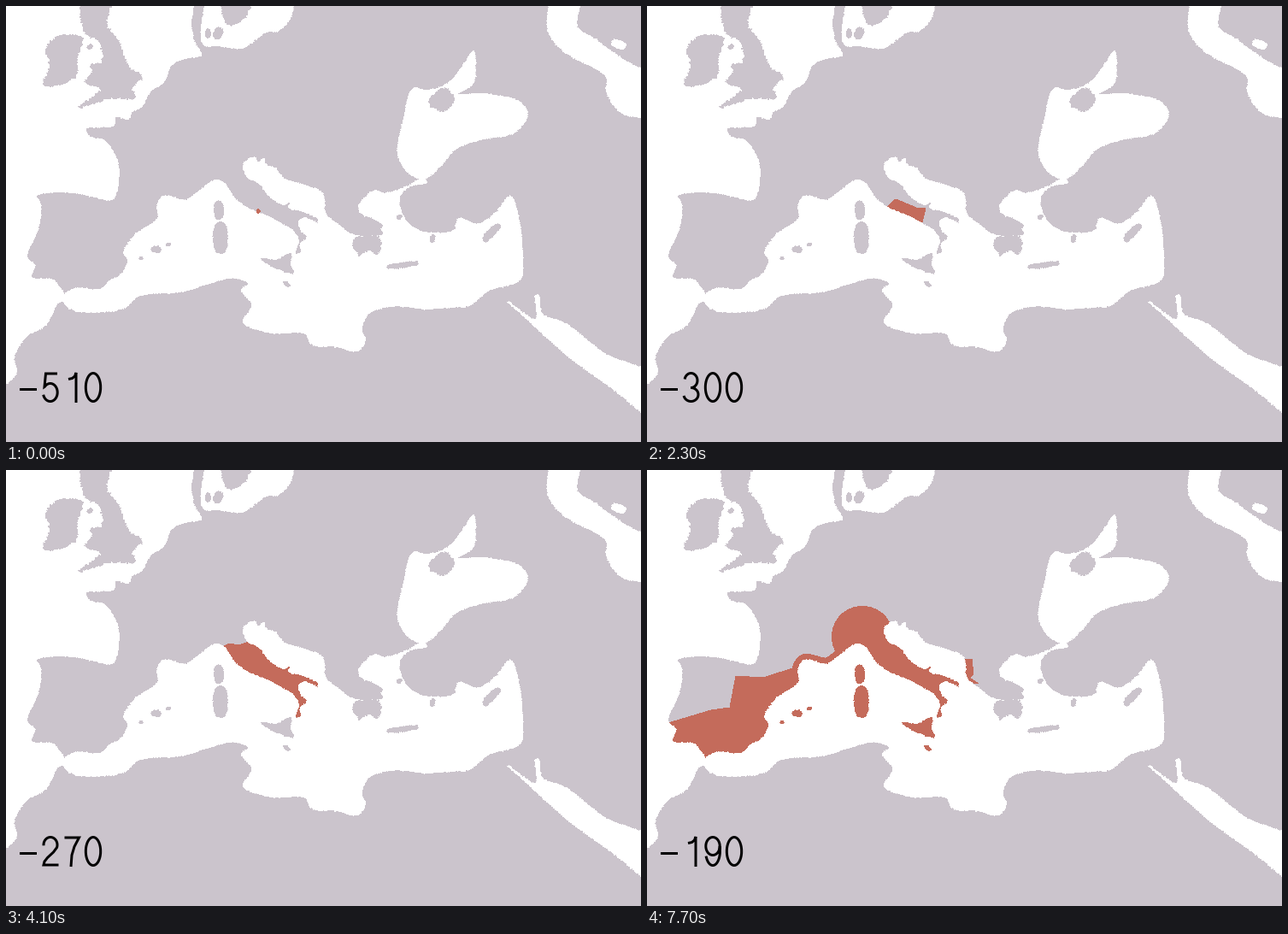
Animation, 743 px wide and 510 px high, one loop 8 s. Source, as a matplotlib script:

```python
import numpy as np
import matplotlib.pyplot as plt
from matplotlib.animation import FuncAnimation
from matplotlib.patches import Circle, PathPatch, Polygon
from matplotlib.path import Path

W, H, DPI = 743, 510, 64
PX = 72 / DPI
LAND, SEA, RED = "#cbc4cc", "#ffffff", "#c46b5b"
INTERVAL, FRAMES = 100, 80
CHANGES = [500, 2300, 4100, 5900, 7700]
YEARS = ["510", "320", "300", "270", "220", "190"]

# Key points of the shores; curve() bends through them, outline() roughens them
ATLANTIC = [
    (-30, -30), (216, -30), (218, 6), (216, 22), (221, 44), (228, 57),
    (210, 61), (193, 69), (185, 88), (168, 100), (158, 118), (146, 124),
    (143, 132), (128, 129), (126, 139), (93, 143), (98, 153), (115, 158),
    (130, 182), (130, 212), (124, 226), (100, 222), (80, 218), (48, 218),
    (35, 222), (40, 232), (37, 262), (24, 293), (33, 304), (29, 318),
    (55, 321), (68, 338), (70, 342), (60, 348), (46, 373), (24, 386),
    (9, 412), (12, 428), (-5, 446), (-30, 460)]
BALTIC = [(238, -30), (232, 5), (229, 26), (231, 45), (250, 46), (276, 49),
          (305, 30), (318, 29), (334, 10), (330, -30)]
SPAIN = [(68, 338), (80, 331), (112, 331), (122, 321), (133, 316), (143, 298),
         (138, 288)]
RIVIERA = [(152, 267), (178, 248), (177, 234), (184, 223), (210, 227),
           (221, 221), (234, 210)]
ITALY = [
    (246, 204), (256, 208), (268, 226), (286, 238), (304, 245), (322, 255),
    (335, 263), (342, 274), (338, 290), (346, 288), (345, 279), (353, 270),
    (346, 263), (343, 253), (349, 248), (360, 252), (366, 256), (365, 249),
    (344, 239), (331, 236), (333, 229), (325, 232), (308, 222), (297, 208),
    (282, 199), (278, 186), (291, 177)]
BALKANS = [
    (294, 184), (301, 179), (304, 186), (315, 190), (325, 202), (350, 210),
    (370, 219), (374, 243), (390, 257), (406, 268), (442, 267), (438, 259),
    (422, 248), (413, 235), (430, 217), (444, 219), (466, 213), (488, 202)]
ANATOLIA = [
    (492, 206), (470, 212), (460, 224), (463, 242), (472, 256), (484, 263),
    (503, 266), (524, 263), (530, 249), (552, 255), (572, 243), (590, 223),
    (600, 250), (604, 295), (601, 320), (564, 333), (542, 350)]
AFRICA = [
    (520, 352), (490, 354), (451, 351), (424, 360), (416, 378), (420, 390),
    (412, 403), (385, 398), (358, 396), (350, 383), (310, 382), (278, 370),
    (288, 350), (276, 332), (284, 325), (266, 318), (205, 334), (155, 339),
    (138, 353), (85, 357), (72, 351), (66, 341)]
BLACK_SEA = [
    (476, 97), (495, 99), (518, 90), (536, 68), (547, 53), (549, 70),
    (546, 91), (528, 103), (560, 103), (600, 112), (610, 126), (595, 148),
    (555, 156), (525, 168), (508, 187), (488, 202), (470, 194), (459, 172),
    (466, 130)]
CASPIAN = [(645, -20), (634, 26), (650, 51), (703, 83), (703, 100), (722, 126),
           (770, 124), (770, 80), (735, 70), (688, 38), (668, 24), (674, -20)]
RED_SEA = [(588, 346), (620, 367), (620, 339), (623, 339), (627, 360),
           (655, 372), (703, 408), (770, 438), (770, 490), (712, 449),
           (656, 408), (605, 362)]
BRITAIN = [
    (92, -20), (92, 30), (110, 42), (112, 66), (99, 70), (103, 76), (93, 89),
    (112, 97), (86, 118), (120, 108), (150, 106), (146, 97), (158, 82),
    (145, 73), (130, 40), (118, 22), (126, -20)]
IRELAND = [(60, 36), (88, 38), (83, 60), (81, 82), (45, 93), (52, 66), (47, 52)]
SWEDEN = [(254, -20), (257, 18), (264, 22), (283, 8), (284, -20)]
CRIMEA = [(495, 112), (512, 97), (524, 108), (512, 123)]
PELOPONNESE = [(407, 274), (424, 269), (438, 274), (434, 290), (425, 285),
               (413, 290)]
SICILY = [(299, 296), (318, 297), (333, 290), (332, 302), (336, 312), (318, 307)]

# Small islands: centre x, centre y, length, width, tilt in degrees
PLAIN_ISLES = [(236, 32, 10, 5, 90), (248, 32, 13, 9, 110), (430, 253, 22, 5, 28),
               (464, 303, 36, 5, -7), (568, 265, 26, 8, -45), (499, 272, 9, 4, 100),
               (460, 247, 5, 4, 0), (98, 48, 6, 4, -30)]
TAKEN_ISLES = {4: [(249, 239, 21, 10, 90), (251, 271, 36, 16, 90)],
               5: [(328, 325, 8, 3, 40), (176, 285, 11, 6, 0),
                   (190, 279, 5, 3, 0), (158, 295, 4, 3, 0)]}

# Territories reach over the water; the sea on top trims them to the coast
SETTLEMENT = [(293, 240), (295, 237), (298, 240), (295, 243)]
LATIUM = [(290, 233), (301, 236), (313, 241), (314, 249), (309, 252), (286, 239)]
CENTRE = [(291, 226), (315, 236), (326, 237), (322, 253), (316, 258), (281, 235)]
PENINSULA = [(255, 206), (262, 203), (272, 205), (285, 201), (296, 200),
             (310, 210), (370, 246), (372, 260), (348, 296), (325, 275), (255, 222)]
ILLYRIA = [(366, 221), (380, 221), (382, 239), (377, 243), (388, 250), (370, 247)]
IBERIA = [(104, 241), (136, 243), (180, 229), (185, 240), (140, 325), (68, 340),
          (20, 325), (22, 297), (75, 281), (97, 278)]


def curve(points, closed=True):
    """Centripetal Hermite spline through the points, about one step per pixel."""
    p = np.array(points, float)
    if closed:
        p = np.vstack([p[-2:], p, p[:3]])
    chord = np.hypot(*np.diff(p, axis=0).T)
    t = np.append(0, np.cumsum(np.sqrt(chord)))
    slope = np.gradient(p, t, axis=0)
    first, last = (2, len(p) - 3) if closed else (0, len(p) - 1)
    s = np.linspace(t[first], t[last], int(chord[first:last].sum()) + 8,
                    endpoint=not closed)
    i = np.clip(np.searchsorted(t, s, side="right") - 1, 0, len(p) - 2)
    gap = (t[i + 1] - t[i])[:, None]
    u = (s - t[i])[:, None] / gap
    return ((1 + 2 * u) * (1 - u) ** 2 * p[i] + u * (1 - u) ** 2 * gap * slope[i]
            + u ** 2 * (3 - 2 * u) * p[i + 1] + u ** 2 * (u - 1) * gap * slope[i + 1])


def outline(points, noise=0.35):
    """Smooth closed shore with a fine saw-tooth edge."""
    line = curve(points)
    rng = np.random.default_rng(4)
    dx, dy = np.gradient(line, axis=0).T
    normal = np.column_stack([-dy, dx]) / (np.hypot(dx, dy) + 1e-9)[:, None]
    saw = 0.5 * (-1.0) ** np.arange(len(line))
    return line + normal * (saw + rng.normal(0, noise, len(line)))[:, None]


def isle(cx, cy, length, width, tilt):
    """Rounded box outline."""
    t = np.linspace(0, 2 * np.pi, 16, endpoint=False)
    x = length / 2 * np.sign(np.cos(t)) * np.abs(np.cos(t)) ** 0.8
    y = width / 2 * np.sign(np.sin(t)) * np.abs(np.sin(t)) ** 0.8
    c, s = np.cos(np.radians(tilt)), np.sin(np.radians(tilt))
    return np.column_stack([cx + c * x - s * y, cy + s * x + c * y])


def arc(cx, cy, rx, ry, start, end):
    t = np.radians(np.linspace(start, end, 40))
    return list(zip(cx + rx * np.cos(t), cy + ry * np.sin(t)))


DIGITS = {
    "0": arc(10.5, 18.5, 8.7, 16.5, 0, 360),
    "1": [(6.5, 9), (11, 8), (14, 5.5), (15.5, 1.5), (15.5, 36.5)],
    "2": (arc(10.5, 11, 8, 9, 175, 380)
          + [(14, 19.5), (7, 26), (3.5, 30.5), (2.5, 34.5), (20, 34.5)]),
    "3": arc(10, 10.5, 7.5, 8.5, 190, 450) + arc(10, 27, 8.5, 8, 270, 530),
    "5": [(18.5, 2.5), (5, 2.5), (3.5, 18)] + arc(10.3, 24.5, 8.4, 10.5, 220, 525),
    "7": [(2, 2.5), (19, 2.5), (13.5, 13), (10.5, 23), (9.5, 36.5)],
    "9": arc(10.5, 12.5, 8.2, 10.5, 0, 360) + arc(10.5, 18.5, 8.4, 16.5, 0, 160),
}


def year_label(year):
    strokes = [Path([(16, 448.5), (36, 448.5)])]
    for i, digit in enumerate(year):
        strokes.append(Path(np.array(DIGITS[digit]) + (41.5 + 25 * i, 427.5)))
    return ax.add_patch(PathPatch(
        Path.make_compound_path(*strokes), fill=False, edgecolor="black",
        linewidth=3 * PX, capstyle="butt", joinstyle="miter", zorder=5))


fig = plt.figure(figsize=(W / DPI, H / DPI), dpi=DPI, facecolor=LAND)
ax = fig.add_axes([0, 0, 1, 1])
ax.set_xlim(0, W)
ax.set_ylim(H, 0)
ax.axis("off")


def fill(points, color, zorder):
    return ax.add_patch(Polygon(points, closed=True, facecolor=color,
                                linewidth=0, antialiased=False, zorder=zorder))


def territory(*shapes):
    return [fill(shape, RED, 1) for shape in shapes]


def northern_lands():
    """The peninsula, a round northern plain and a strip along the western shore."""
    plain = ax.add_patch(Circle((252, 195), 35.5, facecolor=RED, linewidth=0,
                                antialiased=False, zorder=1))
    strip, = ax.plot(*curve(RIVIERA, closed=False).T, color=RED, zorder=1,
                     linewidth=14 * PX, antialiased=False, solid_capstyle="butt")
    return territory(PENINSULA, ILLYRIA) + [plain, strip]


mediterranean = SPAIN + RIVIERA + ITALY + BALKANS + ANATOLIA + AFRICA
lake = isle(717, 45, 16, 9, 20)
for sea in (ATLANTIC, BALTIC, mediterranean, BLACK_SEA, CASPIAN, RED_SEA, lake):
    fill(outline(sea), SEA, 2)
for shore in (BRITAIN, IRELAND, SWEDEN, CRIMEA, PELOPONNESE):
    fill(outline(shore, 0.8), LAND, 3)
for spec in PLAIN_ISLES:
    fill(outline(isle(*spec)), LAND, 3)
taken = [(step, fill(outline(isle(*spec)), LAND, 3))
         for step, specs in TAKEN_ISLES.items() for spec in specs]
taken.append((4, fill(outline(SICILY), LAND, 3)))

scenes = [territory(SETTLEMENT), territory(LATIUM), territory(CENTRE),
          territory(PENINSULA), northern_lands(),
          northern_lands() + territory(IBERIA)]
scenes[0][0].set_zorder(4)
for scene, year in zip(scenes, YEARS):
    scene.append(year_label(year))


def update(frame):
    step = int(np.searchsorted(CHANGES, frame * INTERVAL, side="right"))
    for i, scene in enumerate(scenes):
        for artist in scene:
            artist.set_visible(i == step)
    for start, patch in taken:
        patch.set_facecolor(RED if step >= start else LAND)
    return []


anim = FuncAnimation(fig, update, frames=FRAMES, interval=INTERVAL,
                     repeat=True, repeat_delay=0, blit=False)
plt.show()
```
